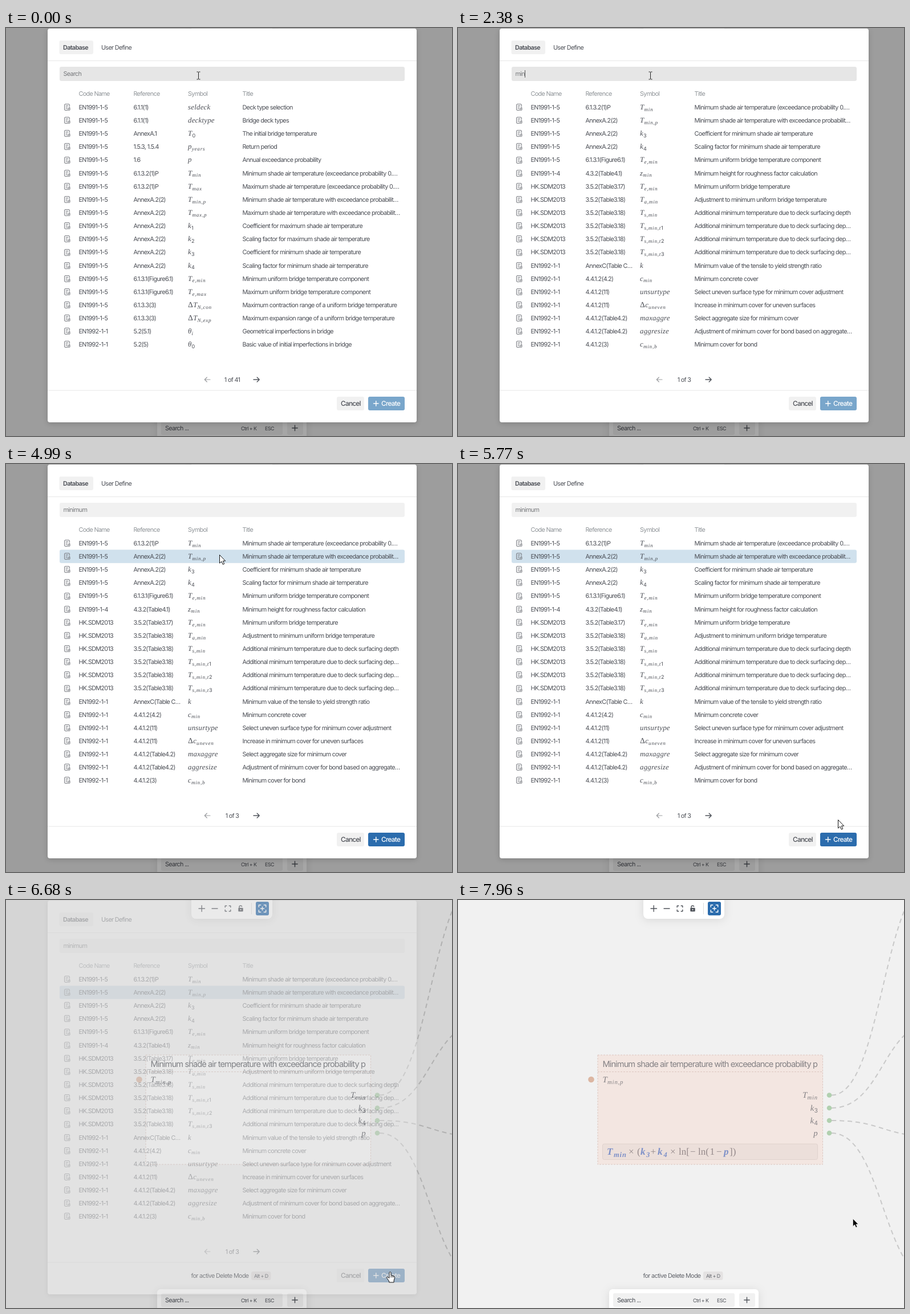
Recreate the animation shown at these times as an HTML page. Size 782x716 px, loop 8 s.

```html
<!DOCTYPE html>
<html lang="en">
<head>
<meta charset="utf-8">
<title>Add item from database</title>
<style>
html, body { margin: 0; width: 100%; height: 100%; overflow: hidden; background: #f1f1f1; }
svg { display: block; width: 100vw; height: 100vh; }
text { font: 10.8px Inter, sans-serif; letter-spacing: -.062em; fill: #4b4e55; text-rendering: geometricPrecision; white-space: pre; }
.head { fill: #8f9498; }
.soft { fill: #77797c; }
.tab { font-weight: 600; }
.btn { font-size: 11.8px; font-weight: 500; }
.key { font-size: 8.9px; }
.title { font-size: 14.6px; }
.math { font: italic 12.8px "Liberation Serif", serif; letter-spacing: .02em; }
.math.big { font-size: 14.8px; }
.sub { font-size: .72em; letter-spacing: .08em; }
.digit { font: .98em Inter, sans-serif; letter-spacing: 0; }
.up { font-style: normal; font-size: 1.08em; }
.formula text { font: 17px "Liberation Serif", serif; letter-spacing: 0; fill: #94898a; }
.formula .var { font-weight: bold; font-style: italic; fill: #7d90c8; }
.formula .low { font-size: 12.5px; letter-spacing: .07em; }
.line { fill: none; stroke: #50545b; stroke-width: 1.4; stroke-linecap: round; stroke-linejoin: round; }
.icon { fill: none; stroke: #74777d; stroke-width: 1; stroke-linecap: round; stroke-linejoin: round; }
.float { filter: drop-shadow(0 2px 8px rgba(0,0,0,.1)); }
</style>
</head>
<body>
<svg id="stage" viewBox="0 0 782 716" xmlns="http://www.w3.org/2000/svg"></svg>
<script>
const LOOP = 8000, ROW_TOP = 127.4, PITCH = 23.14;
const LOADING = 2130, LOADED = 2380, PICK = 4750, CLOSE = 6555, CLOSED = 6760;

const allRows = `EN1991-1-5|6.1.1(1)|seldeck|Deck type selection
EN1991-1-5|6.1.1(1)|decktype|Bridge deck types
EN1991-1-5|AnnexA.1|T_0|The initial bridge temperature
EN1991-1-5|1.5.3, 1.5.4|p_years|Return period
EN1991-1-5|1.6|p|Annual exceedance probability
EN1991-1-5|6.1.3.2(1)P|T_min|Minimum shade air temperature (exceedance probability 0.…
EN1991-1-5|6.1.3.2(1)P|T_max|Maximum shade air temperature (exceedance probability 0.…
EN1991-1-5|AnnexA.2(2)|T_min,p|Minimum shade air temperature with exceedance probabilit…
EN1991-1-5|AnnexA.2(2)|T_max,p|Maximum shade air temperature with exceedance probabilit…
EN1991-1-5|AnnexA.2(2)|k_1|Coefficient for maximum shade air temperature
EN1991-1-5|AnnexA.2(2)|k_2|Scaling factor for maximum shade air temperature
EN1991-1-5|AnnexA.2(2)|k_3|Coefficient for minimum shade air temperature
EN1991-1-5|AnnexA.2(2)|k_4|Scaling factor for minimum shade air temperature
EN1991-1-5|6.1.3.1(Figure6.1)|T_e,min|Minimum uniform bridge temperature component
EN1991-1-5|6.1.3.1(Figure6.1)|T_e,max|Maximum uniform bridge temperature component
EN1991-1-5|6.1.3.3(3)|ΔT_N,con|Maximum contraction range of a uniform bridge temperature
EN1991-1-5|6.1.3.3(3)|ΔT_N,exp|Maximum expansion range of a uniform bridge temperature
EN1992-1-1|5.2(5.1)|θ_i|Geometrical imperfections in bridge
EN1992-1-1|5.2(5)|θ_0|Basic value of initial imperfections in bridge`;

const minRows = `EN1991-1-5|6.1.3.2(1)P|T_min|Minimum shade air temperature (exceedance probability 0.…
EN1991-1-5|AnnexA.2(2)|T_min,p|Minimum shade air temperature with exceedance probabilit…
EN1991-1-5|AnnexA.2(2)|k_3|Coefficient for minimum shade air temperature
EN1991-1-5|AnnexA.2(2)|k_4|Scaling factor for minimum shade air temperature
EN1991-1-5|6.1.3.1(Figure6.1)|T_e,min|Minimum uniform bridge temperature component
EN1991-1-4|4.3.2(Table4.1)|z_min|Minimum height for roughness factor calculation
HK.SDM2013|3.5.2(Table3.17)|T_e,min|Minimum uniform bridge temperature
HK.SDM2013|3.5.2(Table3.18)|T_a,min|Adjustment to minimum uniform bridge temperature
HK.SDM2013|3.5.2(Table3.18)|T_s,min|Additional minimum temperature due to deck surfacing depth
HK.SDM2013|3.5.2(Table3.18)|T_s,min,t1|Additional minimum temperature due to deck surfacing dep…
HK.SDM2013|3.5.2(Table3.18)|T_s,min,t2|Additional minimum temperature due to deck surfacing dep…
HK.SDM2013|3.5.2(Table3.18)|T_s,min,t3|Additional minimum temperature due to deck surfacing dep…
EN1992-1-1|AnnexC(Table C…|k|Minimum value of the tensile to yield strength ratio
EN1992-1-1|4.4.1.2(4.2)|c_min|Minimum concrete cover
EN1992-1-1|4.4.1.2(11)|unsurtype|Select uneven surface type for minimum cover adjustment
EN1992-1-1|4.4.1.2(11)|Δc_uneven|Increase in minimum cover for uneven surfaces
EN1992-1-1|4.4.1.2(Table4.2)|maxaggre|Select aggregate size for minimum cover
EN1992-1-1|4.4.1.2(Table4.2)|aggresize|Adjustment of minimum cover for bond based on aggregate…
EN1992-1-1|4.4.1.2(3)|c_min,b|Minimum cover for bond`;

const text = (x, y, s, cls = '', attr = '') => `<text x="${x}" y="${y}" class="${cls}" ${attr}>${s}</text>`;
const rect = (x, y, w, h, r, fill, attr = '') =>
  `<rect x="${x}" y="${y}" width="${w}" height="${h}" rx="${r}" fill="${fill}" ${attr}/>`;
const path = (d, cls = 'line', attr = '') => `<path d="${d}" class="${cls}" ${attr}/>`;

function symbol(s) {
  const [base, sub] = s.split('_');
  const main = base.replace('Δ', '<tspan class="up">Δ</tspan>');
  if (!sub) return main;
  const low = sub.replace(/\d/g, '<tspan class="digit">$&</tspan>');
  return `${main}<tspan class="sub" dy="2.8">${low}</tspan>`;
}

const docIcon = y => `<g class="icon" transform="translate(107 ${y})">
  <path d="M4.4 -1.6V-4Q4.4 -5.4 3 -5.4H-3Q-4.4 -5.4 -4.4 -4V4Q-4.4 5.4 -3 5.4H1M-2 -2.6H2M-2 0H.6M-2 2.6H0"/>
  <path d="M3.4 .8V3.6M1.7 2V4Q1.7 5.6 3.4 5.6T5.1 4V1.4Q5.1 -.2 3.8 -.2"/></g>`;

const table = (id, rows) => `<g id="${id}">` + rows.split('\n').map((row, i) => {
  const [code, ref, sym, title] = row.split('|');
  const mid = ROW_TOP + PITCH * (i + .5), y = mid + 3.9;
  return docIcon(Math.round(mid)) + text(127.5, y, code) + text(223.5, y, ref) +
    text(319, y, symbol(sym), 'math') + text(414.5, y, title);
}).join('') + '</g>';

// Edges share one span; only the rise to the far node differs.
const ports = [['T_min', 342.5, -381], ['k_3', 365, -150], ['k_4', 387, 28], ['p', 409, 259]];
const edge = ([, y, rise]) =>
  path(`M655 ${y}C745 ${y} 745 ${y + rise} 835 ${y + rise}`, '', 'fill="none" stroke="#c9c9c9" stroke-width="2" stroke-dasharray="8 6"');

const formula = [
  [261, 'T', 'var'], [273, 'min', 'var low', 4], [299, '×'], [314, '('],
  [320, 'k', 'var'], [330, '3', 'var low', 4], [337.5, '+'], [350, 'k', 'var'], [360.5, '4', 'var low', 4],
  [372, '×'], [387, 'ln['], [407, '−'], [421, 'ln('], [441.5, '1'], [453, '−'], [466, 'p', 'var'], [476, '])']
].map(([x, s, cls, drop = 0]) => text(x, 447 + drop, s, cls)).join('');

const node = `<g id="node">
  ${ports.map(edge).join('')}
  <rect id="card" x="245" y="272" width="394.5" height="192" stroke="#dcc6c0" stroke-dasharray="3 2"/>
  ${path('M245 301.5H639.5', '', 'stroke="#dcc6c0" stroke-dasharray="3 2"')}
  <circle cx="233.5" cy="315" r="5.3" fill="#dcb6a2"/>
  ${ports.map(p => `<circle cx="651" cy="${p[1]}" r="4.3" fill="#b1d0af"/>`).join('')}
  <g id="labels">
    ${text(253.5, 292.5, 'Minimum shade air temperature with exceedance probability p', 'title')}
    ${text(253.5, 320, symbol('T_min,p'), 'math big')}
    ${ports.map(p => text(631, p[1] + 4.8, symbol(p[0]), 'math big', 'text-anchor="end"')).join('')}
  </g>
  <g id="formula" class="formula">
    ${rect(253.5, 428, 377, 27.5, 3, '#ecdfda', 'stroke="#e0d2cd"')}${formula}
  </g></g>`;

const corners = r => { const k = r * .45;
  return `M${-r} ${-k}V${-r}H${-k}M${k} ${-r}H${r}V${-k}M${r} ${k}V${r}H${k}M${-k} ${r}H${-r}V${k}`; };

const toolbar = `<g class="float">${rect(325, -10, 142, 43, 8, '#fff')}</g>
  ${path('M338 15H348.5M343.2 9.8V20.2M361 15H371')}
  ${path(corners(4.8), 'line', 'transform="translate(389 15)"')}
  ${rect(407.3, 13.8, 8.4, 6.4, 1, '#50545b')}${path('M409 13.5V12Q409 10 411.3 10T413.5 11.4')}
  <circle cx="411.5" cy="17" r="1" fill="#fff"/>
  ${path('M430.5 5V25', '', 'stroke="#dcdcdc"')}
  ${rect(438, 3, 23, 24, 3, '#2b6cad')}
  <g transform="translate(449.5 15)">${path(corners(6.2) + 'M-3 0H3M0 -3V3', 'line', 'style="stroke:#fff"')}</g>`;

const bottomBar = `<g id="hint">${text(324.5, 663, 'for active Delete Mode')}
  ${rect(430, 652, 34.5, 15, 3, '#e2e0e0')}${text(435, 662.6, 'Alt + D', 'key')}</g>
  <g class="float">${rect(265, 683, 262, 50, 6, '#fff')}</g>
  ${rect(272, 690, 213, 24, 3, '#f1f1f1')}${rect(493, 690, 28, 24, 3, '#f1f1f1')}
  ${text(279, 706, 'Search ...')}${text(412, 705.6, 'Ctrl + K', 'key')}${text(454, 705.6, 'ESC', 'key')}
  ${path('M501.8 702H511.2M506.5 697.3V706.7')}`;

const modal = `<rect id="shade" width="782" height="716" fill="#000"/>
  <g id="modal">
  ${rect(73, 1, 647, 691, 4, '#fff', 'style="filter:drop-shadow(0 2px 4px rgba(0,0,0,.18))"')}
  ${rect(93.5, 22, 59.5, 24, 3, '#f1f1f1')}
  ${text(100, 37.8, 'Database', 'tab')}${text(167, 37.8, 'User Define')}
  ${rect(73, 57, 647, 1, 0, '#e8e8e8')}${rect(73, 635.5, 647, 1, 0, '#e8e8e8')}
  ${rect(94, 68, 605, 25, 3, '#e6e6e6', 'id="field"')}
  ${text(100.5, 84.3, '', 'soft', 'id="query"')}
  ${rect(0, 74, 1, 13, 0, '#555', 'id="caret"')}
  ${[[127.5, 'Code Name'], [223.5, 'Reference'], [319, 'Symbol'], [414.5, 'Title']].map(h => text(h[0], 119, h[1], 'head')).join('')}
  ${rect(94, 0, 605, PITCH, 3, '#f2f2f2', 'id="hover"')}
  ${rect(94, ROW_TOP + PITCH, 605, PITCH, 3, '#d0e1ed', 'id="picked"')}
  ${table('all', allRows)}${table('found', minRows)}
  ${path('M358 617H348.5M352.3 613L348.3 617L352.3 621', 'line', 'style="stroke:#9b9da0;stroke-width:1.2"')}
  ${path('M434 617H444M440.2 613L444.2 617L440.2 621')}
  ${text(396.5, 620.8, '', '', 'id="page" text-anchor="middle"')}
  ${rect(580, 647, 48, 24, 3, '#f1f1f1')}${text(587, 663, 'Cancel', 'btn')}
  ${rect(635, 647, 64, 24, 3, '', 'id="create"')}
  ${path('M644.5 659H653M648.8 654.7V663.3', 'line', 'style="stroke:#fff"')}
  ${text(658, 663, 'Create', 'btn', 'style="fill:#fff"')}
  </g>`;

const arrow = 'M0 0V14.6L3.4 11.5L5.8 16.8L8.2 15.7L5.9 10.6H10.2Z';
const cursors = `
  <g id="beam" fill="none" stroke="#222">${path('M-3 -6.5H-1L0 -5.8L1 -6.5H3M0 -5.8V5.8M-3 6.5H-1L0 5.8L1 6.5H3', '')}</g>
  <g id="arrow">${path(arrow, '', 'fill="#fff" stroke="#111"')}</g>
  <g id="hand">${path('M-1.5 1.2Q0 -1.2 1.5 1.2V6.2L6 7.2Q8.2 7.8 8 10.2L6.6 15.5V18.5H-1.8V16.5L-5.6 11Q-6.6 9 -4.6 8.8L-1.5 11Z', '', 'fill="#fff" stroke="#111"')}
    ${path('M1.5 7V10M3.8 7.2V10M6 7.6V10', '', 'stroke="#111" stroke-width=".8"')}</g>
  <g id="dark">${path(arrow, '', 'transform="scale(.9)" stroke="#fff" stroke-width=".6"')}</g>`;

document.getElementById('stage').innerHTML =
  rect(0, 0, 782, 716, 0, '#f1f1f1') + node + toolbar + bottomBar + modal + cursors;
const el = {};
document.querySelectorAll('#stage [id]').forEach(e => el[e.id] = e);
const show = (e, on) => { e.style.display = on ? '' : 'none'; };
const set = (e, name, value) => e.setAttribute(name, value);

const typing = [[0, ''], [1230, 'm'], [2130, 'mi'], [2290, 'min'], [2650, 'minim'], [2830, 'minimu'], [3020, 'minimum']];
const caretFlips = [300, 790, 1230, 1780, 2130, 3560];
const moves = [
  [0, 337, 83], [3720, 337, 83], [4270, 373, 154], [4420, 373, 154], [4600, 374, 159], [5210, 374, 159],
  [5770, 666, 624], [5960, 670, 641], [6060, 670, 641], [6300, 673, 652], [6810, 673, 652],
  [6930, 675, 654], [7080, 667, 641], [7240, 667, 641], [7960, 692, 559], [LOOP, 692, 559]
];
const clamp = v => Math.max(0, Math.min(1, v));
const ease = v => v * v * (3 - 2 * v);
const last = (list, t) => list.filter(k => k[0] <= t).pop();

function pointer(t) {
  const i = moves.findIndex(m => m[0] > t);
  const [t0, x0, y0] = moves[i - 1], [t1, x1, y1] = moves[i];
  const p = ease((t - t0) / (t1 - t0));
  return [Math.round(x0 + (x1 - x0) * p), Math.round(y0 + (y1 - y0) * p)];
}

function draw(t) {
  const query = last(typing, t)[1];
  el.query.textContent = query || 'Search';
  show(el.caret, caretFlips.filter(f => f <= t).length % 2);
  set(el.caret, 'x', Math.round(100.5 + (query ? el.query.getComputedTextLength() : 0)));

  show(el.all, t < LOADING);
  show(el.found, t >= LOADED);
  el.page.textContent = '1 of ' + (t < LOADING ? 41 : t < LOADED ? 0 : 3);

  const [x, y] = pointer(t);
  const open = t < CLOSED;
  const kind = !open && t >= 6930 ? 'dark' : y < 94 ? 'beam' : y > 646 ? 'hand' : 'arrow';
  for (const k of ['beam', 'arrow', 'hand', 'dark']) {
    show(el[k], k === kind);
    set(el[k], 'transform', `translate(${x + .5} ${y + .5})`);
  }

  const row = Math.floor((y - ROW_TOP) / PITCH);
  show(el.hover, row >= 0 && row < 19);
  set(el.hover, 'y', ROW_TOP + PITCH * row);
  const chosen = t >= PICK;
  show(el.picked, chosen);
  set(el.create, 'fill', chosen ? '#2b6cad' : '#79a6cb');
  set(el.field, 'fill', kind === 'beam' ? '#e6e6e6' : chosen ? '#f1f1f1' : '#eee');

  const fade = 1 - ease(clamp((t - CLOSE) / (CLOSED - CLOSE)));
  set(el.shade, 'opacity', .35 * fade);
  set(el.modal, 'opacity', fade);
  show(el.modal, open);
  show(el.node, t >= CLOSE);
  show(el.formula, !open);
  set(el.card, 'fill', open ? '#fafafa' : '#f3e6e1');
  set(el.labels, 'opacity', open ? 1 : .66);
  set(el.hint, 'opacity', open ? 1 : .85);
}

function tick(now) {
  draw(now % LOOP);
  requestAnimationFrame(tick);
}
draw(0);
requestAnimationFrame(tick);
</script>
</body>
</html>
```
